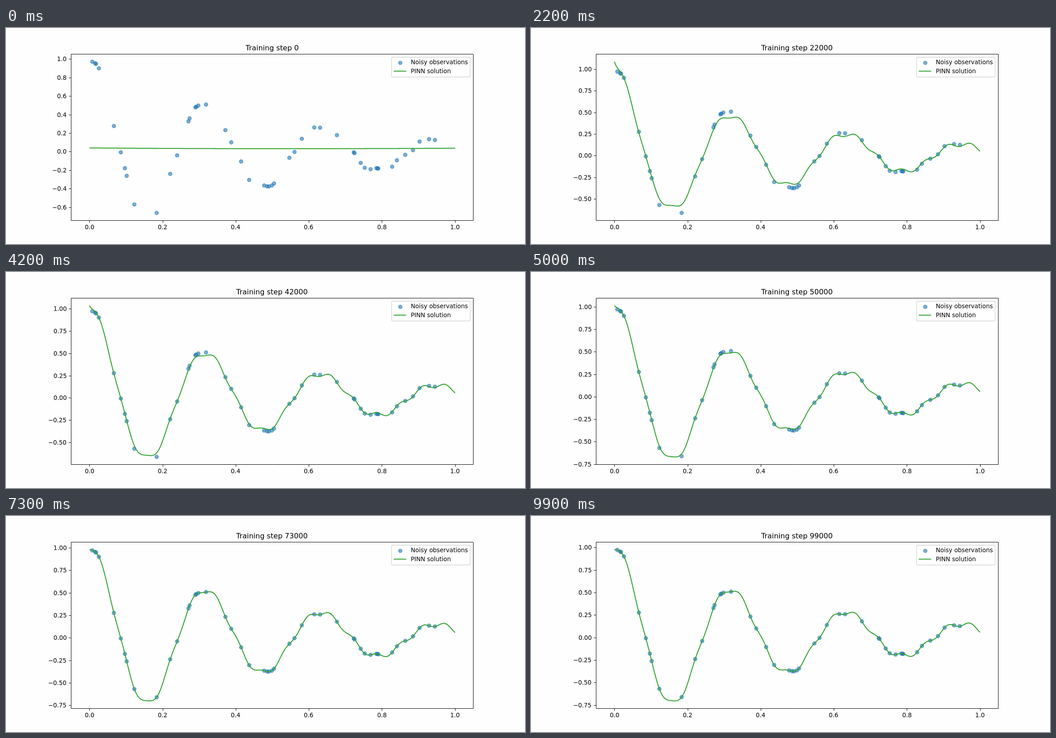
Recreate the animation shown at these times as an HTML page with a canvas. Size 1159 px wide and 483 px high, loop 10 s.

```html
<!DOCTYPE html>
<html lang="en">
<head>
<meta charset="utf-8">
<title>Training progress</title>
<style>
  html, body { margin: 0; overflow: hidden; background: #fefefe; }
  canvas { display: block; }
</style>
</head>
<body>
<canvas id="stage" width="1159" height="483"></canvas>
<script>
const W = 1159, H = 483, PT = 96.6 / 72;
const LEFT = W * 0.125, RIGHT = W * 0.9, TOP = H * 0.12 + 0.5, BOTTOM = H * 0.89 + 0.5;
const SPAN = (RIGHT - LEFT) / 1.1, X0 = LEFT + SPAN * 0.05 + 0.5;
const BLUE = '#1f77b4', GREEN = '#2ca02c', FONT = '"DejaVu Sans", sans-serif';
const ctx = document.getElementById('stage').getContext('2d');

// Damped oscillator with a small fast ripple
const OMEGA = Math.sqrt(396), PHASE = -0.11, SAMPLES = 500;
const swing = x => Math.cos(OMEGA * x + PHASE) / Math.cos(PHASE);
const converged = x => Math.exp(-2 * x) * swing(x) - 0.026 * Math.cos(100 * x);

// Observation times in thousandths
const points = [
  8, 16, 18, 26, 67, 86, 97, 102, 123, 184, 221, 240, 271, 274, 290, 292, 298, 319, 372,
  388, 415, 437, 478, 486, 491, 499, 505, 547, 561, 581, 615, 631, 677, 723, 725, 742,
  753, 769, 785, 788, 790, 828, 841, 864, 885, 903, 929, 945
].map(n => [n / 1000, converged(n / 1000)]);

// How much the peaks are still underestimated while the damping is being learned
function shortfall(x) {
  const c = swing(x), onset = 1 - Math.exp(-((x / 0.08) ** 3));
  return (0.16 + 0.3 * Math.exp(-10 * x)) * onset * Math.exp(-2 * x) * c * Math.abs(c);
}

function solution(step) {
  // Falls linearly, then levels off at zero
  const error = 0.15 * Math.log(1 + Math.exp((1 - 0.0215 * (step - 12)) / 0.15));
  return Array.from({ length: SAMPLES + 1 }, (_, i) => {
    const x = i / SAMPLES;
    const flat = 0.0315 + 0.008 * (1 - x / 0.55) ** 2;
    const fit = converged(x) - error * shortfall(x)
      + error ** 0.85 * 0.137 * Math.exp(-x / 0.009);
    const learned = 1 - Math.exp(-((step / (1.6 + x)) ** 1.5));
    return [x, flat + (fit - flat) * learned];
  });
}

// align: 0 left, 0.5 centre, 1 right
function text(str, x, y, align, size = 10) {
  ctx.font = `${size * PT}px ${FONT}`;
  ctx.fillStyle = '#000';
  ctx.fillText(str, Math.round(x - ctx.measureText(str).width * align), Math.round(y));
}

function line(coords, color, width) {
  ctx.beginPath();
  coords.forEach(([x, y]) => ctx.lineTo(x, y));
  ctx.strokeStyle = color;
  ctx.lineWidth = width;
  ctx.stroke();
}

function dot(x, y) {
  ctx.globalAlpha = 0.6;
  ctx.beginPath();
  ctx.arc(x, y, 3 * PT, 0, 7);
  ctx.fillStyle = ctx.strokeStyle = BLUE;
  ctx.lineWidth = PT;
  ctx.fill();
  ctx.stroke();
  ctx.globalAlpha = 1;
}

const label = (v, digits) => v.toFixed(digits).replace('-', '\u2212');
const snap = v => Math.round(v) + 0.5;

function drawLegend() {
  ctx.beginPath();
  ctx.roundRect(861, 65.5, 175.5, 44, 2.7);
  ctx.fillStyle = 'rgba(255,255,255,.8)';
  ctx.strokeStyle = 'rgba(204,204,204,.8)';
  ctx.lineWidth = PT;
  ctx.fill();
  ctx.stroke();
  dot(880.5, 77.9);
  line([[866, 96.5], [893.5, 96.5]], GREEN, 1.5 * PT);
  text('Noisy observations', 904, 81, 0);
  text('PINN solution', 904, 101, 0);
}

function draw(step) {
  const curve = solution(step);
  const values = [...points, ...curve].map(p => p[1]);
  const min = Math.min(...values), max = Math.max(...values);
  const pad = (max - min) * 0.05, low = min - pad, high = max + pad;
  const toPx = ([x, y]) => [X0 + x * SPAN, BOTTOM - (y - low) / (high - low) * (BOTTOM - TOP)];

  ctx.fillStyle = '#fefefe';
  ctx.fillRect(0, 0, W, H);
  points.forEach(p => dot(...toPx(p)));
  ctx.lineJoin = 'round';
  line(curve.map(toPx), GREEN, 1.5 * PT);

  const left = snap(LEFT), top = snap(TOP), bottom = snap(BOTTOM);
  ctx.strokeStyle = '#000';
  ctx.lineWidth = 1;
  ctx.strokeRect(left, top, snap(RIGHT) - left, bottom - top);

  for (let i = 0; i <= 5; i++) {
    const x = X0 + SPAN * i / 5;
    line([[snap(x), bottom], [snap(x), bottom + 5]], '#000', 1);
    text(label(i / 5, 1), x, 450, 0.5);
  }

  const coarse = (high - low) / 9 > 0.2, gap = coarse ? 0.25 : 0.2;
  for (let i = Math.ceil(low / gap); i * gap <= high; i++) {
    const y = toPx([0, i * gap])[1];
    line([[left - 5, snap(y)], [left, snap(y)]], '#000', 1);
    text(label(i * gap, coarse ? 2 : 1), LEFT - 7 * PT, y + 5, 1);
  }

  text(`Training step ${step * 1000}`, (LEFT + RIGHT) / 2, 50, 0.5, 12);
  drawLegend();
}

const began = performance.now();
let shown = -1;
function tick() {
  const step = Math.floor((performance.now() - began) / 100) % 100;
  if (step !== shown) draw(shown = step);
  requestAnimationFrame(tick);
}
tick();
</script>
</body>
</html>
```
